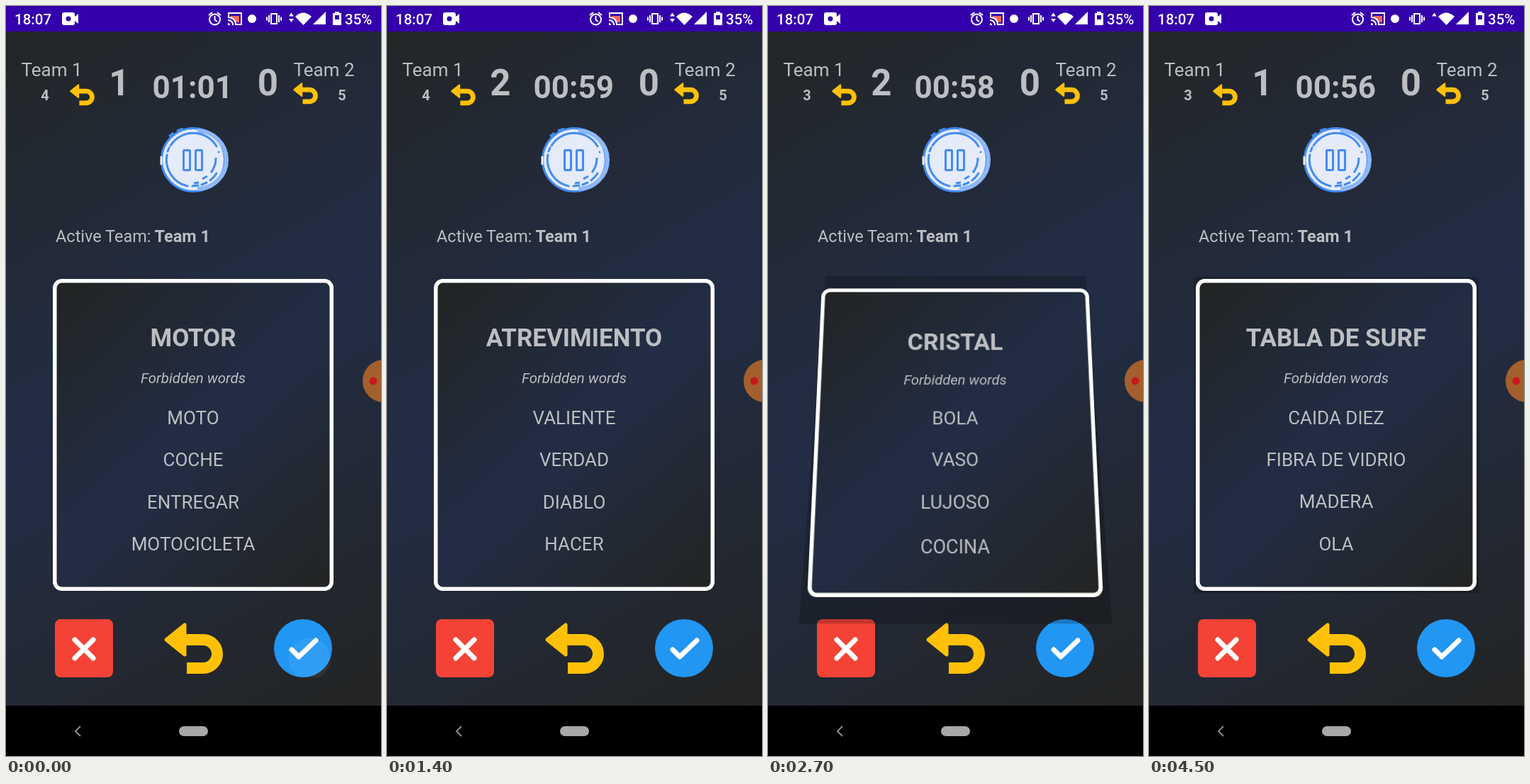
Animation, 529 px wide and 1058 px high, one loop 5 s. Source, as an HTML page:

```html
<!DOCTYPE html>
<html lang="en">
<head>
<meta charset="utf-8">
<title>Forbidden words</title>
<style>
html, body { margin: 0; width: 529px; height: 1058px; overflow: hidden; background: #000; }
svg { position: absolute; left: 0; top: 0; font-family: Roboto, sans-serif; }
#card { left: 66px; top: 385px; overflow: visible; }
.label { fill: #bcbec1; }
.bold { font-weight: 700; }
.mid { text-anchor: middle; }
</style>
</head>
<body>
<svg width="529" height="987">
  <defs>
    <linearGradient id="pageFill" gradientUnits="userSpaceOnUse" x1="0" y1="36" x2="529" y2="987">
      <stop offset="0" stop-color="#232627"/><stop offset=".5" stop-color="#222d45"/><stop offset="1" stop-color="#232423"/>
    </linearGradient>
    <g id="undo" fill="#ffc107" stroke="#ffc107">
      <path d="M226 894 252 873V915Z" stroke-width="5" stroke-linejoin="round"/>
      <path d="M250 894H278a20 20 0 0 1 0 40H255" fill="none" stroke-width="16"/>
    </g>
  </defs>
  <rect width="529" height="987" fill="url(#pageFill)"/>

  <!-- status bar -->
  <rect width="529" height="36" fill="#3400ac"/>
  <g fill="#fff">
    <text x="12" y="26" font-size="20.5" font-weight="500">18:07</text>
    <text x="478" y="26" font-size="20.5" font-weight="500">35%</text>
    <path d="M82 9H94q3 0 3 3V15l5-4V25l-5-4V24q0 3-3 3H82q-3 0-3-3V12q0-3 3-3Z"/>
    <circle cx="88" cy="18" r="3.5" fill="#3400ac"/>
    <circle cx="347" cy="18" r="6"/>
    <path d="M408 15Q419 4 431 15L419.500 27ZM433 26 451 8V26ZM464 10V8H470V10H473V27H461V10Z"/>
    <path d="M399 14.500 402.500 9.500 406 14.500Z"/>
    <path id="down" d="M399 18 402.500 23 406 18Z"/>
    <path d="M464 13H470V19H464Z" fill="#3400ac"/>
    <path d="M317 14H329V23H324Q323 17 317 16Z" fill="#f06a5e"/>
    <path d="M313 24V27H316Q316 24 313 24"/>
  </g>
  <g fill="none" stroke="#fff" stroke-width="2">
    <circle cx="294.500" cy="19" r="7.500"/>
    <path d="M294.500 14V19.500L298 22M286 13 291 9M303 13 298 9"/>
    <path d="M314 15V10H332V26H325M313 20q7 0 7 7M313 16q11 0 11 11"/>
    <path d="M374 11H382V25H374ZM371 13V23M385 13V23M368 15.500V20.500M388 15.500V20.500"/>
  </g>

  <!-- scores -->
  <g class="label">
    <text x="21.500" y="99" font-size="26">Team 1</text>
    <text x="405.500" y="99" font-size="26">Team 2</text>
    <g class="bold">
      <text id="undos" class="mid" x="55" y="133" font-size="20"></text>
      <text class="mid" x="474" y="133" font-size="20">5</text>
      <text id="score" class="mid" x="160" y="126" font-size="51"></text>
      <text class="mid" x="369.500" y="126" font-size="51">0</text>
      <text id="clock" x="206.500" y="130" font-size="44"></text>
    </g>
    <text x="70" y="333" font-size="23.500">Active Team: <tspan class="bold" x="209.500">Team 1</tspan></text>
  </g>
  <use href="#undo" transform="translate(-3.700 -255.400) scale(.42)"/>
  <use href="#undo" transform="translate(311.400 -257.400) scale(.42)"/>

  <!-- pause -->
  <g fill="none" stroke="#438cf3" stroke-width="3">
    <circle cx="264" cy="217" r="44.500" fill="#e5ebf8"/>
    <path d="M270 176A41 41 0 0 1 270 258" stroke="#8db8f8" stroke-width="6"/>
    <path d="M232 197A38 38 0 0 1 297 198M300 206V206M297 236A38 38 0 0 1 288 246M283 249 276 252M271 253 263 254M256 254A38 38 0 0 1 227 210M228 205 230 200" stroke-linecap="round"/>
    <path d="M296 214A33 33 0 0 1 289 235M284 240 277 244M272 249 265 250M230 184 236 179M241 176 250 173"/>
    <path d="M219 212V224" stroke="#e5ebf8"/>
    <rect x="250.500" y="203.500" width="9" height="28" rx="1"/>
    <rect x="267.500" y="203.500" width="9" height="28" rx="1"/>
  </g>

  <!-- actions -->
  <rect x="69" y="865" width="82" height="82" rx="8" fill="#f44336"/>
  <circle cx="419" cy="906" r="41" fill="#2196f3"/>
  <use href="#undo"/>
  <path d="M97 894 123 920M123 894 97 920M403 908 413 918 437 895" fill="none" stroke="#fff" stroke-width="7" stroke-linecap="round" stroke-linejoin="round"/>
  <svg id="touch" y="865" width="88" height="82"><circle id="ripple" fill="#fff"/></svg>
  <path id="shadow" stroke="#000" stroke-width="6" stroke-linejoin="round"/>
</svg>

<svg id="card" width="396" height="440" viewBox="66 385 396 440">
  <linearGradient id="cardFill" gradientUnits="userSpaceOnUse" x1="66" y1="385" x2="462" y2="825">
    <stop offset="0" stop-color="#222422"/><stop offset=".5" stop-color="#222d45"/><stop offset="1" stop-color="#232422"/>
  </linearGradient>
  <rect id="frame" x="68.800" y="387.800" width="390.500" height="434.500" rx="10" fill="url(#cardFill)" stroke-width="5.500"/>
  <g class="label mid">
    <text class="word bold" x="264" y="480" font-size="35"></text>
    <text x="264" y="532" font-size="20.500" font-style="italic">Forbidden words</text>
    <g font-size="26">
      <text class="word" x="264" y="590"></text>
      <text class="word" x="264" y="649"></text>
      <text class="word" x="264" y="708.500"></text>
      <text class="word" x="264" y="768"></text>
    </g>
  </g>
</svg>

<svg width="529" height="1058">
  <circle cx="533" cy="529" r="30" fill="#a3602c"/>
  <circle cx="518" cy="529" r="5.500" fill="#c5191c"/>
  <rect y="987" width="529" height="71"/>
  <path d="M105 1016 98 1023 105 1030" fill="none" stroke="#8c8c8c" stroke-width="2"/>
  <rect x="244" y="1016" width="41" height="14" rx="7" fill="#a8a8a8"/>
</svg>

<script>
const $ = id => document.getElementById(id);
const clamp = v => Math.max(0, Math.min(1, v));
const LOOP = 5000, STEP = 100, FLIP = 1000;
const CX = 264.5, CY = 605, HALF_W = 198, HALF_H = 220;
const EYE = 695, LIGHT = 886, LIGHT_Y = 22;

// tint: which RGB channels start at full strength
const turns = [
  { start: -FLIP, axis: 'Y', turn: 0, tint: [1, 1, 1], score: 1, undos: 4,
    words: ['MOTOR', 'MOTO', 'COCHE', 'ENTREGAR', 'MOTOCICLETA'] },
  { start: 255, axis: 'Y', turn: 360, tint: [0, 0, 1], score: 2, undos: 4,
    words: ['ATREVIMIENTO', 'VALIENTE', 'VERDAD', 'DIABLO', 'HACER'] },
  { start: 1905, axis: 'X', turn: -360, tint: [1, 1, 0], score: 2, undos: 3,
    words: ['CRISTAL', 'BOLA', 'VASO', 'LUJOSO', 'COCINA'] },
  { start: 3505, axis: 'Y', turn: -360, tint: [1, 0, 0], score: 1, undos: 3,
    words: ['TABLA DE SURF', 'CAIDA DIEZ', 'FIBRA DE VIDRIO', 'MADERA', 'OLA'] }
];
const taps = [
  { left: 375, x: 53, y: 56, start: -30, end: 640 },
  { left: 221, x: 44, y: 45, start: 1920, end: 2245 },
  { left: 66, x: 51, y: 46, start: 3420, end: 3800 }
];

// cubic-bezier(.4, 0, .2, 1)
function ease(p) {
  let lo = 0, hi = 1;
  for (let i = 0; i < 24; i++) {
    const u = (lo + hi) / 2, v = 1 - u;
    if (1.2 * v * v * u + .6 * v * u * u + u ** 3 < p) lo = u; else hi = u;
  }
  return lo * lo * (3 - 2 * lo);
}

// A card corner seen by the eye, then cast away from the lamp.
function castCorner([sx, sy], axis, angle) {
  let x = sx * HALF_W, y = sy * HALF_H, z;
  const c = Math.cos(angle), s = Math.sin(angle);
  if (axis === 'Y') { z = -x * s; x *= c; } else { z = y * s; y *= c; }
  const near = EYE / (EYE - z), cast = LIGHT / (LIGHT - z);
  return [CX + x * near * cast, LIGHT_Y + (CY + y * near - LIGHT_Y) * cast];
}

function drawCard(t, { start, axis, turn, tint, words }) {
  const p = clamp((t - start) / FLIP), done = p === 1, e = done ? 1 : ease(p);
  const deg = done ? 0 : turn * e, angle = deg * Math.PI / 180;
  $('card').style.transform = done ? 'none' : `perspective(${EYE}px) rotate${axis}(${deg}deg)`;
  const soft = 255 * (e <= .0031 ? 12.92 * e : 1.055 * e ** (1 / 2.4) - .055);
  $('frame').setAttribute('stroke', `rgb(${tint.map(c => c ? 255 : Math.round(soft))})`);
  document.querySelectorAll('.word').forEach((el, i) => el.textContent = words[i]);

  const corners = [[-1, -1], [1, -1], [1, 1], [-1, 1]].map(k => castCorner(k, axis, angle));
  $('shadow').setAttribute('d', 'M' + corners.join('L') + 'Z');
  $('shadow').setAttribute('opacity', done ? 0 : Math.cos(angle) > 0 ? .2 : .04);
}

function drawRipple(t) {
  const tap = taps.find(k => t >= k.start && t < k.end);
  $('touch').style.display = tap ? '' : 'none';
  if (!tap) return;
  const age = t - tap.start, ripple = $('ripple');
  $('touch').setAttribute('x', tap.left);
  ripple.setAttribute('cx', tap.x);
  ripple.setAttribute('cy', tap.y);
  ripple.setAttribute('r', 10 + .65 * age);
  ripple.setAttribute('opacity', .2 * clamp(age / 90) * clamp((tap.end - t) / 220));
}

function draw(t) {
  const now = turns.filter(k => t >= k.start).pop();
  const left = 61 - Math.floor((t + 750) / 1000);
  const two = n => String(n).padStart(2, '0');
  $('clock').textContent = two(Math.floor(left / 60)) + ':' + two(left % 60);
  $('score').textContent = now.score;
  $('undos').textContent = now.undos;
  $('down').style.display = t < 3500 ? '' : 'none';
  drawCard(t, now);
  drawRipple(t);
}

const begin = performance.now();
function tick() {
  const t = (performance.now() - begin) % LOOP;
  draw(Math.floor(t / STEP) * STEP);
  requestAnimationFrame(tick);
}
tick();
</script>
</body>
</html>
```
